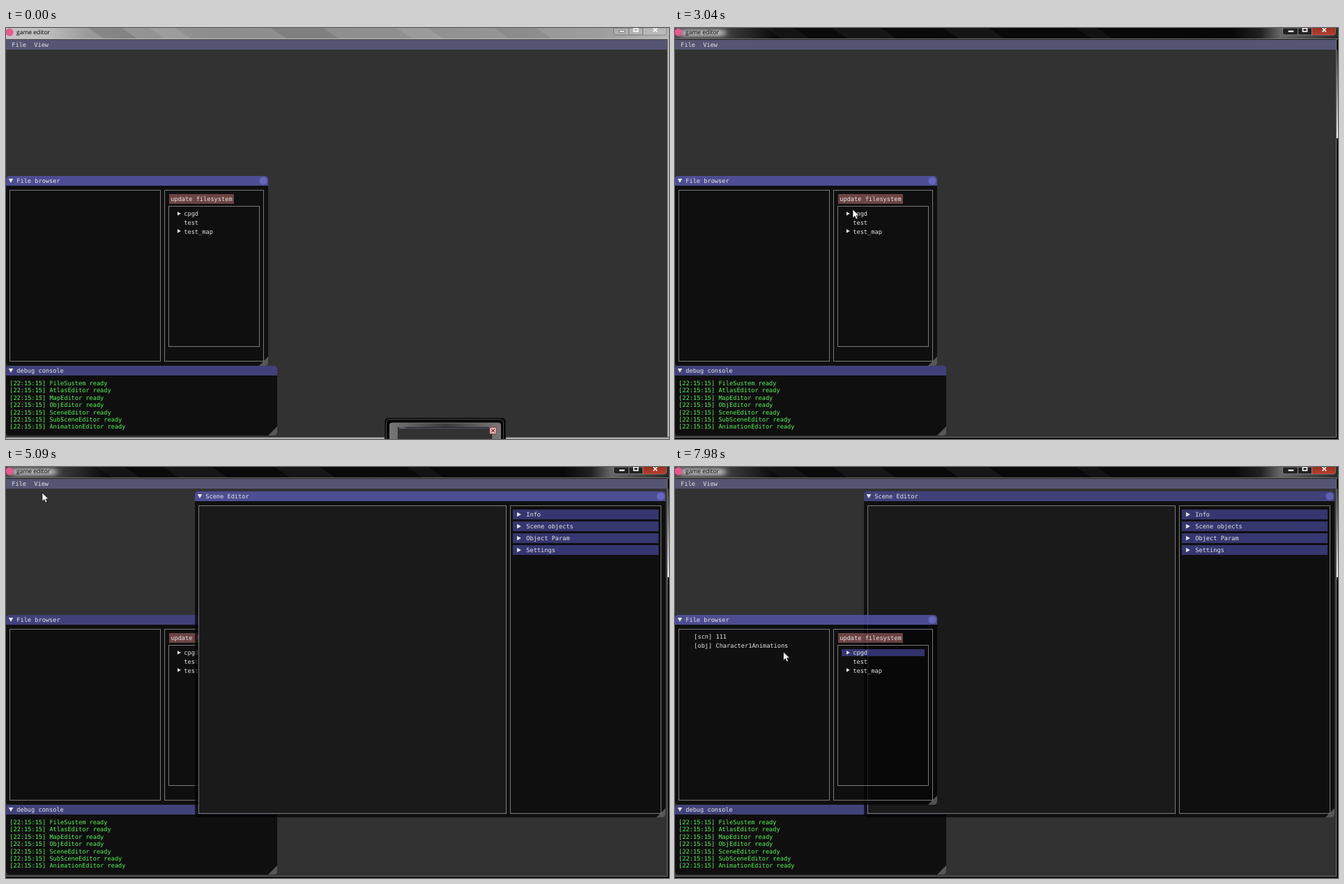
Recreate the animation shown at these times as an HTML page. Size 951 by 589 pixels, loop 8 s.

```html
<!DOCTYPE html>
<html lang="en">
<head>
<meta charset="utf-8">
<title>game editor</title>
<style>
  html, body { margin: 0; width: 100%; height: 100%; overflow: hidden; background: #323232; }
  svg { display: block; width: 951px; height: 589px; }
  text { font: 8.63px "DejaVu Sans Mono", monospace; text-rendering: geometricPrecision; white-space: pre; }
  text.caption { font: 8.5px "Open Sans", "Noto Sans", sans-serif; }
</style>
</head>
<body>
<svg id="stage" viewBox="0 0 951 589" xmlns="http://www.w3.org/2000/svg"></svg>
<script>
const LOOP = 8000;
const INK = '#e6e6e6';
const TITLE = { on: 'rgba(82,82,161,.87)', off: 'rgba(69,69,138,.83)' };
const HEADER = 'rgba(102,102,230,.45)';
const HOVER = 'rgba(115,115,230,.8)';

// Drawing helpers
const rect = (x, y, w, h, fill, more = '') =>
  `<rect x="${x}" y="${y}" width="${w}" height="${h}" fill="${fill}" ${more}/>`;
const frame = (x, y, w, h, color = 'rgba(178,178,178,.65)') =>
  rect(x + .5, y + .5, w - 1, h - 1, 'none', `stroke="${color}"`);
const path = (d, fill, more = '') => `<path d="${d}" fill="${fill}" ${more}/>`;
const text = (x, mid, s, fill = INK) =>
  `<text x="${x + .3}" y="${mid + 3}" fill="${fill}">${s}</text>`;
const group = (id, body) => `<g id="${id}">${body}</g>`;
const right = (x, y, r) => path(`M${x} ${y - r}l${r * 1.8} ${r}l${-r * 1.8} ${r}z`, INK);
const down = (x, y) => path(`M${x} ${y - 3}h6.4l-3.2 6z`, INK);
const gradient = (id, stops) => `<linearGradient id="${id}" gradientUnits="userSpaceOnUse" x1="0" y1="0" x2="951" y2="0">` +
  stops.map(([x, c]) => `<stop offset="${x / 951}" stop-color="${c}"/>`).join('') + '</linearGradient>';
// Slanted glass streak across the caption bar
const streak = (x, w, fill) => path(`M${x} 0h${w}l22 15h${-w}z`, fill);

function panel(id, x, y, w, h, name, closable) {
  const bar = 14;
  const top = `M${x} ${y + bar}v${5 - bar}q0-5 5-5h${w - 10}q5 0 5 5v${bar - 5}z`;
  const body = `M${x} ${y + bar}h${w}v${h - bar - 5}q0 5-5 5h${10 - w}q-5 0-5-5z`;
  const grip = `M${x + w} ${y + h - 13}v8q0 5-5 5h-8z`;
  return path(body, 'rgba(0,0,0,.7)') +
    path(top, TITLE.off, `id="${id}Title"`) +
    path(grip, 'rgba(255,255,255,.3)') +
    down(x + 3.8, y + bar / 2) + text(x + 15, y + bar / 2, name) +
    (closable ? `<circle cx="${x + w - 7}" cy="${y + bar / 2}" r="5.6" fill="rgba(128,128,230,.5)"/>` : '');
}

function captionButtons(edge, closeFill, fill) {
  const glyph = 'stroke="#333" stroke-width=".5"';
  return path('M871.5 0v7q0 3 3 3h70q3 0 3-3v-7z', fill, `stroke="${edge}"`) +
    path('M914 0h33.5v7q0 3-3 3h-30.5z', closeFill) +
    path('M893.5 0v10M913.5 0v10', 'none', `stroke="${edge}"`) +
    rect(879.5, 3.5, 8, 2.5, '#fff', glyph) +
    rect(900.5, .5, 6, 4.5, 'none', 'stroke="#fff" stroke-width="1.6"') +
    path('M928.5 0l5.5 5.5M934 0l-5.5 5.5', 'none', 'stroke="#fff" stroke-width="1.7"');
}

const caption = '<circle cx="5" cy="6" r="5.5" fill="#e8588f"/>' +
  `<text class="caption" x="15" y="9" fill="#000">game editor</text>`;

const pale = rect(0, 0, 951, 16, 'url(#paleBar)') +
  streak(118, 48, 'rgba(0,0,0,.12)') + streak(205, 38, 'rgba(255,255,255,.1)') +
  streak(380, 75, 'rgba(0,0,0,.1)') + streak(560, 45, 'rgba(255,255,255,.1)') +
  streak(700, 60, 'rgba(0,0,0,.07)') +
  rect(0, 15, 951, 1, '#c2c2c2') + rect(0, 16, 949, 1, '#444') +
  rect(949, 15, 2, 574, '#b4b4b4') + rect(948, 16, 1, 571, '#555') +
  rect(0, 586, 951, 1, '#555') + rect(0, 587, 951, 2, '#b0b0b0') +
  captionButtons('#777', 'rgba(190,190,190,.5)', 'rgba(190,190,190,.5)') +
  // Preview thumbnail
  path('M543.5 589v-25q0-5 5-5h163q5 0 5 5v25z', '#050505', 'stroke="#1b1b1b"') +
  path('M545.5 589v-24q0-4 4-4h160q4 0 4 4v24', 'none', 'stroke="#4a4a4a"') +
  path('M550.5 589v-20q0-3 3-3h153q3 0 3 3v20z', 'url(#thumb)', 'stroke="#777"') +
  rect(562, 572, 135, 17, '#323232') + frame(562, 572, 135, 20, '#222') +
  rect(563, 573, 133, 1, '#555573') + rect(564, 572.6, 9, 1, '#8a8ab0') +
  rect(694, 572.5, 9, 9, '#e4d5d5', 'stroke="#944"') +
  path('M696 574.5l5 5M701 574.5l-5 5', 'none', 'stroke="#b02020" stroke-width="1.5"');

const dark = rect(0, 0, 951, 16, 'url(#darkBar)') +
  rect(8, 2, 64, 10, 'rgba(255,255,255,.6)', 'filter="url(#soft)"') +
  streak(130, 40, 'rgba(255,255,255,.04)') + streak(225, 70, 'rgba(255,255,255,.05)') +
  streak(385, 65, 'rgba(255,255,255,.05)') + streak(575, 30, 'rgba(255,255,255,.04)') +
  rect(0, 15, 951, 1, '#777') + rect(0, 16, 949, 1, '#1a1a1a') +
  rect(949, 16, 2, 573, '#0c0c0c') + rect(949, 31, 2, 127, 'url(#shine)') +
  rect(948, 16, 1, 571, '#777') +
  rect(0, 586, 949, 1, '#777') + rect(0, 587, 951, 2, '#0c0c0c') +
  captionButtons('#8a8a8a', 'url(#red)', '#222');

const rowMids = [266, 279, 291.5];
const files = panel('files', 0, 212, 376, 272, 'File browser', true) +
  frame(5, 232, 217, 246) + frame(227, 232, 143, 246) + frame(233, 255, 131, 202) +
  rect(234, 238, 93, 14, 'rgba(171,102,102,.6)') + text(236, 245, 'update filesystem') +
  rowMids.map((y, i) => rect(239, y - 5, 119, 10, HOVER, `id="row${i}"`)).join('') +
  ['cpgd', 'test', 'test_map'].map((s, i) => text(255, rowMids[i], s)).join('') +
  right(246, 266, 2.7) + right(246, 291, 2.7) +
  group('list', text(27, 243, '[scn] 111') + text(27, 255.7, '[obj] Character1Animations'));

const log = ['FileSustem', 'AtlasEditor', 'MapEditor', 'ObjEditor', 'SceneEditor', 'SubSceneEditor', 'AnimationEditor'];
const consolePanel = panel('log', 0, 484, 389, 100, 'debug console', false) +
  log.map((s, i) => text(5, 509 + i * 10.4, `[22:15:15] ${s} ready`, '#59f559')).join('');

const scene = panel('scene', 271, 35, 675, 467, 'Scene Editor', true) +
  rect(277, 55, 441, 442, '#1a1a1a') + frame(276, 55, 442, 442) + frame(723, 55, 217, 442) +
  ['Info', 'Scene objects', 'Object Param', 'Settings'].map((s, i) => {
    const y = 68 + i * 17;
    return rect(727, y - 7, 209, 14, HEADER) + right(733, y, 3.3) + text(746, y, s);
  }).join('');

const views = ['Scene editor', 'SubScene editor', 'Object editor', 'Map editor', 'Atlas editor',
  'Script editor', 'Animation editor', 'File browser', 'Inspector', 'Debug console'];
const menu = rect(31, 31, 111, 135, 'rgba(13,13,25,.92)') + frame(31, 31, 111, 135) +
  rect(34, 36, 105.5, 12, HOVER, 'id="pick"') +
  views.map((s, i) => text(37, 42 + i * 12.62, s)).join('');

const menuBar = rect(0, 17, 948, 14, '#555573') +
  rect(34, 17, 32, 14, HOVER, 'id="viewTab"') + text(8, 24, 'File') + text(40, 24, 'View');

const stage = document.getElementById('stage');
stage.innerHTML = '<defs>' +
  gradient('paleBar', [[0, '#c4c4c4'], [60, '#bdbdbd'], [120, '#999'], [300, '#8d8d8d'], [600, '#909090'], [850, '#9d9d9d'], [951, '#b5b5b5']]) +
  gradient('darkBar', [[0, '#4a4a4a'], [80, '#3a3a3a'], [145, '#0a0a0a'], [800, '#080808'], [840, '#222'], [868, '#666'], [951, '#2a2a2a']]) +
  gradient('thumb', [[550, '#777'], [630, '#3a3a3a'], [709, '#777']]) +
  '<filter id="soft" x="-30%" y="-150%" width="160%" height="400%"><feGaussianBlur stdDeviation="5 2.5"/></filter>' +
  '<linearGradient id="red" x2="0" y2="1"><stop stop-color="#9c2f1f"/><stop offset="1" stop-color="#b84030"/></linearGradient>' +
  '<linearGradient id="shine" x2="0" y2="1"><stop stop-color="#333"/><stop offset="1" stop-color="#eee"/></linearGradient></defs>' +
  rect(0, 0, 951, 589, '#323232') +
  group('layers', group('console', consolePanel) + group('files', files) + group('scene', scene)) +
  group('pale', pale) + group('dark', dark) + caption + menuBar + group('menu', menu) +
  path('M0 0V12.2L2.9 9.5L4.8 14L6.9 13.1L5 8.8H9Z', '#fff', 'id="cursor" stroke="#000" stroke-width=".6"');

const $ = id => document.getElementById(id);
const show = (id, on) => $(id).setAttribute('visibility', on ? 'visible' : 'hidden');
const paint = (id, fill) => $(id).setAttribute('fill', fill);

// Pointer moves: start, end, number of steps, destination
const entry = [483, 563];
const moves = [
  [1580, 1950, 8, 342, 354],
  [2090, 2660, 11, 255, 260],
  [3040, 3560, 11, 66, 1],
  [3610, 3730, 3, 51, 23],
  [4370, 4770, 8, 52, 37],
  [5350, 5600, 5, 459, 184],
  [5740, 6180, 9, 162, 296],
  [6380, 6540, 4, 236, 269],
  [6570, 7090, 11, 268, 265],
  [7480, 7980, 10, 155.5, 265]
];
const smooth = p => p * p * (3 - 2 * p);

function pointer(t) {
  let [x, y] = entry;
  for (const [start, end, n, tx, ty] of moves) {
    if (t < start) break;
    const step = Math.floor((t - start) / (end - start) * (n - 1) + 1e-6);
    const p = smooth(Math.min(1, step / (n - 1)));
    x += (tx - x) * p;
    y += (ty - y) * p;
  }
  return [x, y];
}

let raised = null;
function raiseFiles(on) {
  if (on === raised) return;
  raised = on;
  $('layers').insertBefore($('files'), on ? null : $('scene'));
}

function render(t) {
  const [x, y] = pointer(t);
  const active = t >= 1010, menuOpen = t >= 4180 && t < 5090, sceneOpen = t >= 5090;
  const inside = (x0, y0, x1, y1) => x >= x0 && x < x1 && y >= y0 && y < y1;

  show('pale', !active);
  show('dark', active);
  show('cursor', t >= 1580);
  $('cursor').setAttribute('transform', `translate(${x} ${y})`);

  const onView = t >= 3040 && inside(34, 17, 66, 31);
  show('viewTab', menuOpen || (onView && !sceneOpen));
  paint('viewTab', onView ? HOVER : HEADER);
  show('menu', menuOpen);
  show('pick', menuOpen && y >= 35.5);

  show('scene', sceneOpen);
  raiseFiles(t >= 6280);
  paint('filesTitle', t < 4230 || t >= 6330 ? TITLE.on : TITLE.off);
  paint('sceneTitle', t < 6330 ? TITLE.on : TITLE.off);

  const reachable = t >= 1580 && (t < 4180 || t >= 6330);
  const chosen = t >= 7250;
  rowMids.forEach((mid, i) => {
    const over = reachable && inside(239, mid - 5, 358, mid + 5);
    show('row' + i, over || (chosen && i === 0));
    paint('row' + i, over ? HOVER : HEADER);
  });
  show('list', chosen);
}

const origin = performance.now();
function tick() {
  render((performance.now() - origin) % LOOP);
  requestAnimationFrame(tick);
}
render(0);
requestAnimationFrame(tick);
</script>
</body>
</html>
```
